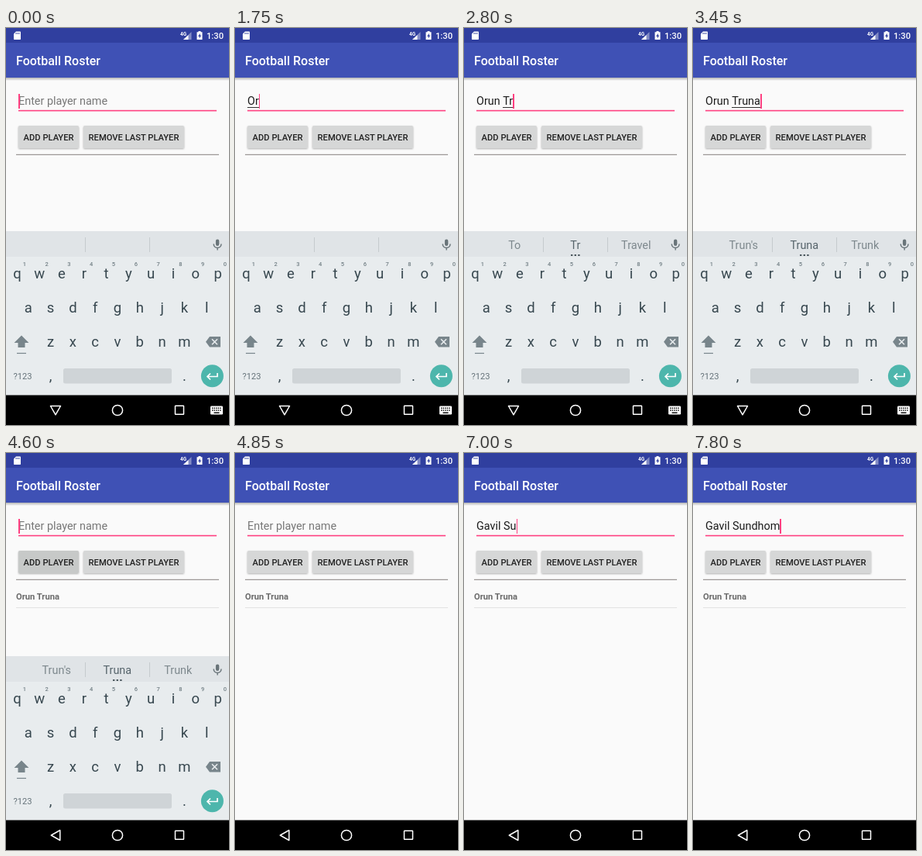
Write an HTML page that moves like this. It is 288 px wide and 512 px high and loops after 8000 ms.

```html
<!DOCTYPE html>
<html lang="en">
<head>
<meta charset="utf-8">
<title>Football Roster</title>
<style>
html, body { margin: 0; width: 100%; height: 100%; overflow: hidden; background: #fafafa; }
#stage { position: relative; width: 288px; height: 512px; overflow: hidden; font-family: Roboto, sans-serif; }
svg { position: absolute; left: 0; top: 0; display: block; }
.mid { text-anchor: middle; }
.med { font-weight: 500; }
#edit { position: absolute; left: 16px; top: 85px; height: 19px; font-size: 14.4px; line-height: 19px; white-space: pre; color: #1c1c1c; }
#hint { position: absolute; left: 0; top: 0; color: #777; }
#word { box-shadow: inset 0 -1px #333; display: inline-block; height: 18px; vertical-align: top; }
#caret { position: absolute; left: 100%; top: 0; width: 1.7px; height: 19px; background: #ff4081; }
</style>
</head>
<body>
<div id="stage">
<svg width="288" height="512" viewBox="0 0 288 512">
  <defs>
    <linearGradient id="shade" x2="0" y2="1">
      <stop stop-color="#000" stop-opacity=".28"/><stop offset="1" stop-color="#000" stop-opacity="0"/>
    </linearGradient>
    <filter id="lift" x="-10%" y="-20%" width="120%" height="150%">
      <feDropShadow dx="0" dy="1" stdDeviation=".8" flood-opacity=".3"/>
    </filter>
  </defs>
  <rect width="288" height="512" fill="#fafafa"/>
  <rect y="64" width="288" height="4" fill="url(#shade)"/>
  <rect width="288" height="64" fill="#3f51b5"/>
  <rect width="288" height="19" fill="#303f9f"/>

  <g fill="#fff">
    <path d="M13 4.5h5.2q.8 0 .8.8v8.9q0 .8-.8.8h-7.4q-.8 0-.8-.8V7.5z"/>
    <path d="M13 6v2M15 6v2M17 6v2" stroke="#303f9f" stroke-width=".9"/>
    <path d="M239.500 5v10h-10.500z" opacity=".4"/>
    <path d="M235.500 9v6h-6.500z"/>
    <text x="225" y="9.500" font-size="6.400" font-weight="700">4G</text>
    <path d="M248.500 4h3v1.200h2V15h-7V5.200h2z"/>
    <path d="M250.700 6.800l-2.700 4h1.700v2.800l2.500-4.200h-1.600z" fill="#303f9f"/>
    <text class="med" x="259" y="14" font-size="11.200">1:30</text>
    <text class="med" x="13" y="48" font-size="16">Football Roster</text>
  </g>

  <rect x="16" y="105.800" width="256" height="1.600" fill="#ff4081"/>
  <g filter="url(#lift)">
    <rect id="add" x="16" y="126" width="78" height="29" rx="1.600" fill="#d6d7d7"/>
    <rect x="100" y="126" width="130" height="29" rx="1.600" fill="#d6d7d7"/>
  </g>
  <g class="mid med" font-size="11.200" fill="#202020">
    <text x="55" y="144.500">ADD PLAYER</text>
    <text x="165" y="144.500">REMOVE LAST PLAYER</text>
  </g>
  <rect x="13" y="162.800" width="262" height="1" fill="#86807f"/>
  <g id="item">
    <text x="13" y="188.500" font-size="11.200" font-weight="700" fill="#6b6b6b">Orun Truna</text>
    <rect x="13" y="199" width="262" height="1" fill="#e2e2e2"/>
  </g>

  <g id="board">
    <rect y="262" width="288" height="212" fill="#e8ecee"/>
    <rect y="262" width="288" height="33" fill="#e0e4e7"/>
    <path d="M102.500 270v19M185.500 270v19" stroke="#c5cbce"/>
    <g class="mid" font-size="14.400" fill="#7d888d">
      <text class="tip" x="65.300" y="285"></text>
      <text class="tip" x="143.800" y="285" fill="#56646b"></text>
      <text class="tip" x="222.300" y="285"></text>
    </g>
    <path id="dots" d="M138 293h2.400M142.600 293h2.400M147.200 293h2.400" stroke="#4b585e" stroke-width="2.200"/>
    <g fill="none" stroke="#697479" stroke-width="1.500">
      <rect x="270.900" y="272.500" width="4.400" height="8.500" rx="2.200" fill="#697479" stroke="none"/>
      <path d="M268.200 278.500c0 6.600 9.800 6.600 9.800 0M273.100 283.300v3.200"/>
    </g>
    <g id="keys" class="mid" font-size="18.500" fill="#37474f"></g>
    <path d="M20 396.500l9.500 9.500h-5v6h-9v-6h-5z" fill="#78858b"/>
    <path d="M14 419.500h12" stroke="#78858b" stroke-width="1.200"/>
    <path d="M263 398h14v13.500h-14l-5-6.750z" fill="#78858b"/>
    <path d="M266 401.300l7 7m0-7l-7 7" stroke="#e8ecee" stroke-width="1.600"/>
    <text class="mid" x="21.500" y="453" font-size="11.200" fill="#66737a">?123</text>
    <rect x="74" y="439" width="140" height="19.500" rx="2.500" fill="#cfd4d7"/>
    <circle cx="266.400" cy="448.800" r="14.500" fill="#4db6ac"/>
    <path d="M273 445v4.500h-13m4-4l-4 4 4 4" fill="none" stroke="#fff" stroke-width="1.700"/>
  </g>

  <rect y="473.500" width="288" height="39" fill="#000"/>
  <g fill="none" stroke="#fff" stroke-width="1.500">
    <path id="back" d="M58.300 493L69.800 486.500v13z" stroke-linejoin="round"/>
    <path id="down" d="M57.500 487.500h13L64 498.800z" stroke-linejoin="round"/>
    <circle cx="144" cy="493" r="6.600"/>
    <rect x="218.500" y="487.300" width="11" height="11" rx=".5"/>
  </g>
  <g id="ime">
    <rect x="264" y="487.500" width="16" height="11" rx="1.200" fill="#fff"/>
    <path d="M266 490.300h12M266 493h12" stroke="#000" stroke-width="1.400" stroke-dasharray="1.400 1.150"/>
    <path d="M268.500 496.200h7" stroke="#000" stroke-width="1.400"/>
  </g>
</svg>
<div id="edit"><span id="hint">Enter player name</span><span id="done"></span><span id="word"></span><i id="caret"></i></div>
</div>
<script>
const $ = id => document.getElementById(id);
const LOOP = 8000, PRESS = 4200, ADDED = 4300, NAV = 4600, HIDE = 4700, GONE = 4850;

const first = { text: "Orun Truna", at: [1400, 1750, 1850, 2050, 2350, 2650, 2750, 2950, 3200, 3400] };
const second = { text: "Gavil Sundhom", at: [5850, 6000, 6200, 6250, 6450, 6550, 6800, 7000, 7300, 7400, 7600, 7750, 7800] };
const resets = [0, ...first.at, ADDED, ...second.at];

const tips = [
  [0, "", "", ""],
  [1800, "Of", "Or", "Our"],
  [1900, "Our", "Oru", "Orbit"],
  [2150, "Run", "Orun", "Orange"],
  [2350, "", "", ""],
  [2500, "and", "is", "the"],
  [2700, "To", "T", "The"],
  [2800, "To", "Tr", "Travel"],
  [3000, "True", "Tru", "Trust"],
  [3250, "Run", "Trun", "Trunk"],
  [3450, "Trun's", "Truna", "Trunk"]
];

function addKey(ch, x, y, style = "") {
  $("keys").insertAdjacentHTML("beforeend", `<text x="${x}" y="${y}" ${style}>${ch}</text>`);
}
[["qwertyuiop", 14.4, 323], ["asdfghjkl", 28.8, 367], ["zxcvbnm", 57.6, 411]].forEach(([row, x, y]) =>
  [...row].forEach((ch, i) => addKey(ch, x + 28.8 * i, y)));
[..."1234567890"].forEach((n, i) => addKey(n, 23.8 + 28.8 * i, 307, 'font-size="7.5" font-weight="500" fill="#727f85"'));
addKey(",", 57.6, 455);
addKey(".", 230.4, 455);

const show = (id, on) => { $(id).style.visibility = on ? "visible" : "hidden"; };
const put = (el, s) => { if (el.textContent !== s) el.textContent = s; };
const latest = (list, t) => list.filter(v => v <= t).pop();
const tipEls = document.querySelectorAll(".tip");

function draw(t) {
  const field = t < ADDED ? first : second;
  const typed = field.text.slice(0, field.at.filter(v => v <= t).length);
  const cut = field === first ? typed.lastIndexOf(" ") + 1 : typed.length;
  put($("done"), typed.slice(0, cut));
  put($("word"), typed.slice(cut));
  show("hint", !typed);
  show("caret", (t - latest(resets, t)) % 1000 < 500);

  const tip = tips.filter(v => v[0] <= t).pop();
  tipEls.forEach((el, i) => put(el, tip[i + 1]));
  show("dots", tip[2] !== "");

  const ripple = t < HIDE ? Math.min(1, Math.max(0, (t - PRESS) / 150)) : 0;
  $("add").setAttribute("fill", `rgb(${214 - 15 * ripple},${215 - 14 * ripple},${215 - 15 * ripple})`);
  show("item", t >= ADDED + 50);

  const away = t < HIDE + 50 ? 0 : Math.min(1, (t - HIDE) / (GONE - HIDE));
  $("board").setAttribute("opacity", 1 - away);
  $("board").setAttribute("transform", `translate(0 ${42 * away * away})`);
  show("down", t < NAV);
  show("ime", t < NAV);
  show("back", t >= NAV);
}

let start;
function tick(now) {
  start ??= now;
  draw((now - start) % LOOP);
  requestAnimationFrame(tick);
}
draw(0);
requestAnimationFrame(tick);
</script>
</body>
</html>
```
